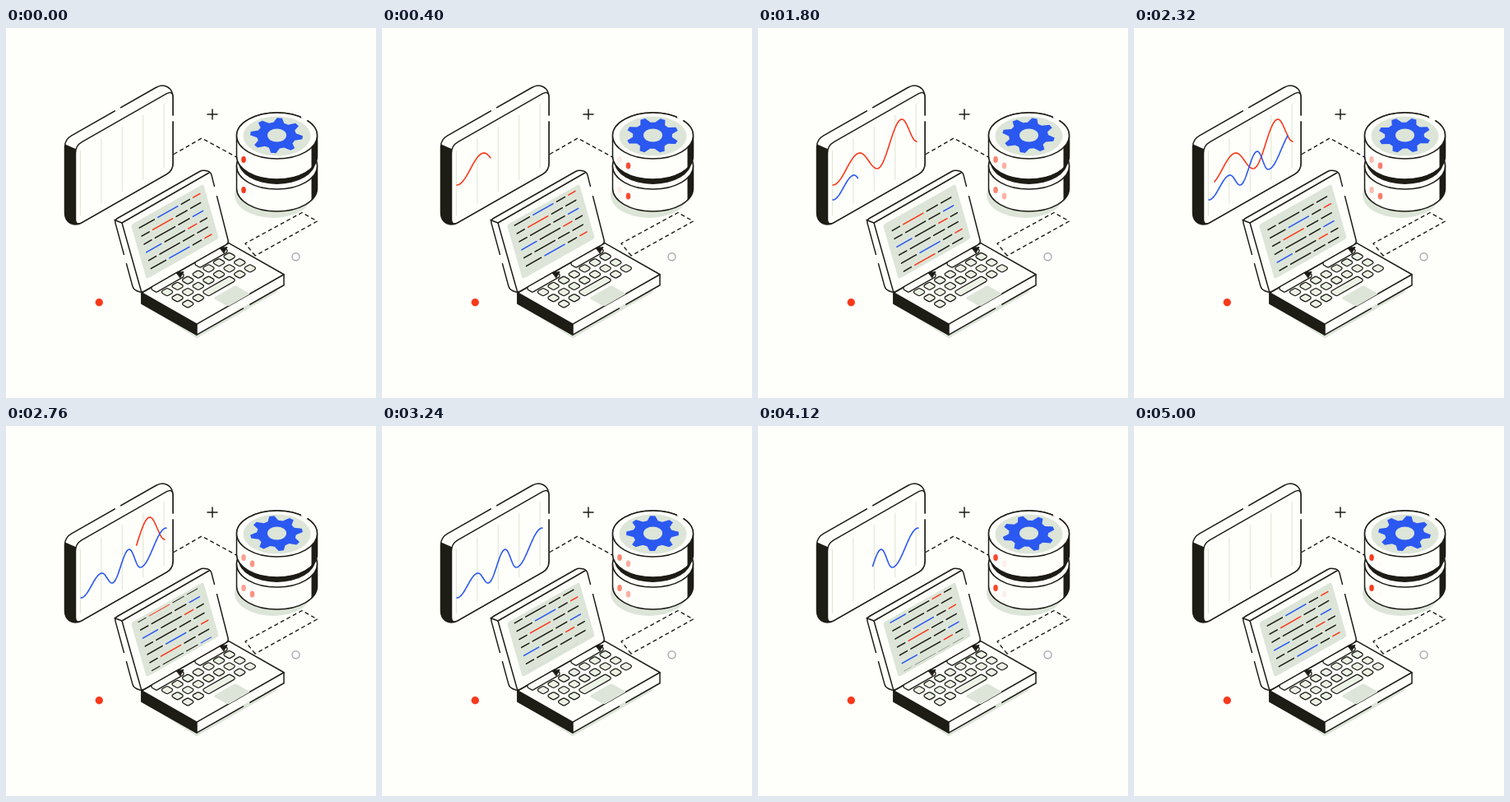
Animation, 450 px wide and 450 px high, one loop 5040 ms. Source, as an HTML page with a canvas:

```html
<!DOCTYPE html>
<html lang="en">
<head>
<meta charset="utf-8">
<title>Data workspace</title>
<style>
html, body { margin: 0; width: 100%; height: 100%; overflow: hidden; background: #fefefb; }
canvas { display: block; width: 450px; height: 450px; }
</style>
</head>
<body>
<canvas id="stage" width="450" height="450"></canvas>
<script>
const ctx = document.getElementById('stage').getContext('2d');
const LOOP = 5040;
const TAU = Math.PI * 2;
const PAPER = '#fefefb', INK = '#1d1c15', TINT = '#dce5d8';
const RED = '#f8391c', BLUE = '#2b58f0';

const wave = p => (1 - Math.cos(Math.PI * p)) / 2;
const ease = (t, start, span) => wave(Math.min(1, Math.max(0, (t - start) / span)));

// Isometric axes: a runs up to the right, b down to the right, h straight down.
const iso = (x, y) => (a, b = 0, h = 0) => [x + a + b, y + (b - a) * 0.57 + h];

// Visible silhouette of an isometric box, from its top left corner clockwise
const boxOutline = (at, a, b, h) =>
  [at(0, 0), at(a, 0), at(a, b), at(a, b, h), at(0, b, h), at(0, 0, h)];

function trace(points, closed = false) {
  ctx.beginPath();
  points.forEach(p => ctx.lineTo(...p));
  if (closed) ctx.closePath();
}

function traceRounded(points, reach) {
  const n = points.length;
  const toward = (p, q) => {
    const length = Math.hypot(q[0] - p[0], q[1] - p[1]);
    const k = Math.min(reach / length, 0.5);
    return [p[0] + (q[0] - p[0]) * k, p[1] + (q[1] - p[1]) * k];
  };
  ctx.beginPath();
  points.forEach((p, i) => {
    ctx.lineTo(...toward(p, points[(i + n - 1) % n]));
    ctx.quadraticCurveTo(...p, ...toward(p, points[(i + 1) % n]));
  });
  ctx.closePath();
}

function paint(fill, stroke, width = 1.5) {
  if (fill) { ctx.fillStyle = fill; ctx.fill(); }
  if (stroke) { ctx.strokeStyle = stroke; ctx.lineWidth = width; ctx.stroke(); }
}

function poly(points, fill, stroke, width) {
  trace(points, true);
  paint(fill, stroke, width);
}

function rounded(points, reach, fill, stroke, width) {
  traceRounded(points, reach);
  paint(fill, stroke, width);
}

function line(points, color = INK, width = 1.5) {
  trace(points);
  paint(null, color, width);
}

function ellipse(x, y, rx, ry, fill, stroke, width) {
  ctx.beginPath();
  ctx.ellipse(x, y, rx, ry, 0, 0, TAU);
  paint(fill, stroke, width);
}

function clipped(draw) {
  ctx.save();
  ctx.clip();
  draw();
  ctx.restore();
}

function dashed(points) {
  ctx.setLineDash([5, 3.5]);
  ctx.lineCap = 'butt';
  line(points, INK, 1.4);
  ctx.setLineDash([]);
  ctx.lineCap = 'round';
}

// Smooth chart line through its turning points, with running lengths
function makeCurve(turns) {
  const steps = 24, samples = [];
  for (let i = 0; i < turns.length - 1; i++) {
    const [x0, y0] = turns[i], [x1, y1] = turns[i + 1];
    for (let s = 0; s <= steps; s++) {
      const p = s / steps;
      samples.push([x0 + (x1 - x0) * p, y0 + (y1 - y0) * wave(p)]);
    }
  }
  let total = 0;
  const lengths = samples.map((p, i) =>
    i ? total += Math.hypot(p[0] - samples[i - 1][0], p[1] - samples[i - 1][1]) : 0);
  return { samples, lengths, total };
}

const curves = [
  { color: RED, delay: 0, ...makeCurve([[91, 191], [124, 152], [145, 171], [175, 111], [193, 138]]) },
  { color: BLUE, delay: 1470,
    ...makeCurve([[91, 209], [117, 179], [129, 191], [150, 150], [163, 172], [195, 124]]) }
];

function drawCurve({ samples, lengths, total, color, delay }, t) {
  const from = ease(t, delay + 2200, 1000) * total;
  const to = ease(t, delay, 1000) * total;
  if (to - from < 0.5) return;
  line(samples.filter((_, i) => lengths[i] >= from && lengths[i] <= to), color, 1.6);
}

function drawMonitor(t) {
  const width = 118.5, height = 98, depth = 13;
  const front = iso(84.5, 143);
  const shell = boxOutline(iso(...front(0, -depth)), width, depth, height);
  traceRounded(shell, 9);
  paint(PAPER);
  clipped(() => poly([front(0, -15, 6), front(4, 0, 8), front(4, 0, 110), front(0, -15, 110)], INK));
  rounded(shell, 9, null, INK);
  rounded([front(0), front(width), front(width, 0, height), front(0, 0, height)], 9, PAPER, INK);
  line([front(63, -depth), front(66, -depth)], PAPER, 4);
  line([front(width, 0, 33), front(width, 0, 36)], PAPER, 4);

  for (let i = 0; i < 5; i++) {
    const a = 6 + i * 25.4;
    line([front(a, 0, 10), front(a, 0, 88)], '#e3e9d6', 1.2);
  }
  curves.forEach(curve => drawCurve(curve, t));
}

function drawGear(t) {
  ctx.save();
  ctx.translate(329, 130.7);
  ctx.scale(1, 0.67);
  ctx.rotate(0.12 - TAU * t / LOOP);
  ctx.beginPath();
  for (let i = 0; i < 32; i++) {
    const radius = i % 4 < 2 ? 32 : 24;
    const angle = (Math.floor(i / 2) + (i % 2 ? 0.3 : -0.3) + (i % 4 < 2 ? -0.05 : 0) * (i % 2 ? 1 : -1)) * TAU / 16;
    ctx.lineTo(radius * Math.cos(angle), radius * Math.sin(angle));
  }
  ctx.closePath();
  paint(BLUE);
  ctx.restore();
  ellipse(329.5, 130.5, 11.5, 8, TINT);
}

const disk = { x: 329.5, rx: 49, ry: 28 };

function drawDisk(top, height) {
  const { x, rx, ry } = disk;
  ctx.beginPath();
  ctx.ellipse(x, top, rx, ry, 0, Math.PI, TAU);
  ctx.ellipse(x, top + height, rx, ry, 0, 0, Math.PI);
  ctx.closePath();
  paint(PAPER, INK);
  clipped(() => {
    ctx.fillStyle = INK;
    ctx.fillRect(371.5, top, 10, 60);
  });
  ellipse(x, top, rx, ry, PAPER, INK);
}

function drawServer(t) {
  const { x, rx, ry } = disk;
  ellipse(325, 203, 47, 28, TINT);
  drawDisk(168, 27);
  ellipse(x, 162, rx - 2, ry, INK);
  drawDisk(131, 25);
  line([[361, 108.5], [365, 111]], PAPER, 4);
  ellipse(x, 131.5, 41, 24, TINT);
  drawGear(t);

  const glow = 1 - wave(10 * t / LOOP);
  for (const y of [160, 197]) {
    [glow, 1 - glow].forEach((alpha, i) => {
      ctx.globalAlpha = alpha;
      ellipse(289 + 10.5 * i, y + 7.5 * i, 2.8, 3.9, RED);
    });
  }
  ctx.globalAlpha = 1;
}

// Dash widths of the two line layouts; each row names its dash colours.
const layouts = [[9, 24, 13, 12], [18, 24, 10, 8]];
const rows = ['krkk', 'kkkb', 'bkrk', 'kkkk', 'kbkr'];
const palette = { k: INK, r: RED, b: BLUE };

function drawRow(index, v) {
  const layout = layouts[index > 0 && index % 2 === 0 ? 1 : 0];
  let u = 8;
  layout.forEach((width, i) => {
    line([[u, v], [u + width, v]], palette[rows[index][i]], 1.5);
    u += width + 4.5;
  });
}

function drawCode(t) {
  const gap = 9.9, count = rows.length;
  const scroll = 4 * count * gap * ease(t, 0, LOOP) % (count * gap);
  ctx.save();
  ctx.transform(1, -0.565, 0.285, 1, 152, 239.5);
  ctx.beginPath();
  ctx.roundRect(0, 0, 88, 66, 3);
  paint(TINT);
  ctx.beginPath();
  ctx.rect(0, 3, 88, 60);
  clipped(() => {
    for (let i = -count; i < 2 * count; i++) drawRow((i + count) % count, 18 + i * gap - scroll);
  });
  ctx.restore();
}

function drawKey(col, row, span = 1) {
  const [x, y] = iso(196, 321)(12.6 * col, 12.6 * row);
  const size = 6.6;
  const cap = iso(x - size, y - 1);
  rounded(boxOutline(cap, size + 12.6 * (span - 1), size, 2.2), 1.5, '#edf2e7', INK, 1.3);
}

function drawHinge(x, y) {
  const at = iso(x, y);
  rounded(boxOutline(at, 33, 6, 3), 1, PAPER, INK, 1.3);
  poly([at(30), at(34, 5, -2), at(31, 4, 4)], INK, INK, 1);
}

function drawLaptop(t) {
  const width = 106, depth = 67, height = 13;
  const base = iso(165, 322);
  poly([base(4, 0, 18), base(0, depth, height + 4), base(width - 8, depth, height + 4), base(width, 40)], TINT);
  poly(boxOutline(base, width, depth, height), PAPER, INK);
  poly([base(0), base(0, depth), base(0, depth, height), base(0, 0, height)], INK, INK);
  line([base(0, depth), base(width, depth)]);
  line([base(58, depth, height), base(63, depth, height)], TINT, 3);

  const pad = iso(252, 328.5);
  rounded([pad(0), pad(27), pad(27, 18), pad(0, 18)], 2, TINT);
  for (let row = 0; row < 3; row++) {
    for (let col = 6; col >= 0; col--) {
      const underSpaceBar = row === 2 && col > 1 && col < 5;
      if (!underSpaceBar) drawKey(col, row);
    }
  }
  drawKey(2, 2, 3);

  const edge = [[132, 233.5], [141, 237], [247, 176], [249, 175]];
  rounded([edge[0], [239, 172.5], edge[3], base(width), base(0), [155, 318]], 4, PAPER, INK);
  line(edge.slice(0, 3));
  line([edge[1], base(0)]);
  ctx.lineCap = 'butt';
  line([[253.7, 193], [256.6, 204]], PAPER, 4);
  line([[143.5, 276], [146.5, 286]], PAPER, 3.5);
  ctx.lineCap = 'round';
  drawCode(t);
  drawHinge(177, 315);
  drawHinge(230, 285);
}

function drawExtras() {
  line([[245, 105], [257, 105]]);
  line([[251, 99], [251, 111]]);
  ellipse(113.3, 333.7, 4.7, 4.7, RED);
  ellipse(352.5, 278.3, 4.5, 4.5, null, '#aaaaaf', 1.4);
  dashed([[204, 153.5], [238, 134], [284, 159]]);
  dashed([[303, 277], [291, 262], [360, 224.5], [378.5, 235], [303, 277]]);
}

function draw(t) {
  ctx.fillStyle = PAPER;
  ctx.fillRect(0, 0, 450, 450);
  ctx.lineCap = ctx.lineJoin = 'round';
  drawExtras();
  drawMonitor(t);
  drawServer(t);
  drawLaptop(t);
}

function tick() {
  draw(performance.now() % LOOP);
  requestAnimationFrame(tick);
}
tick();
</script>
</body>
</html>
```
